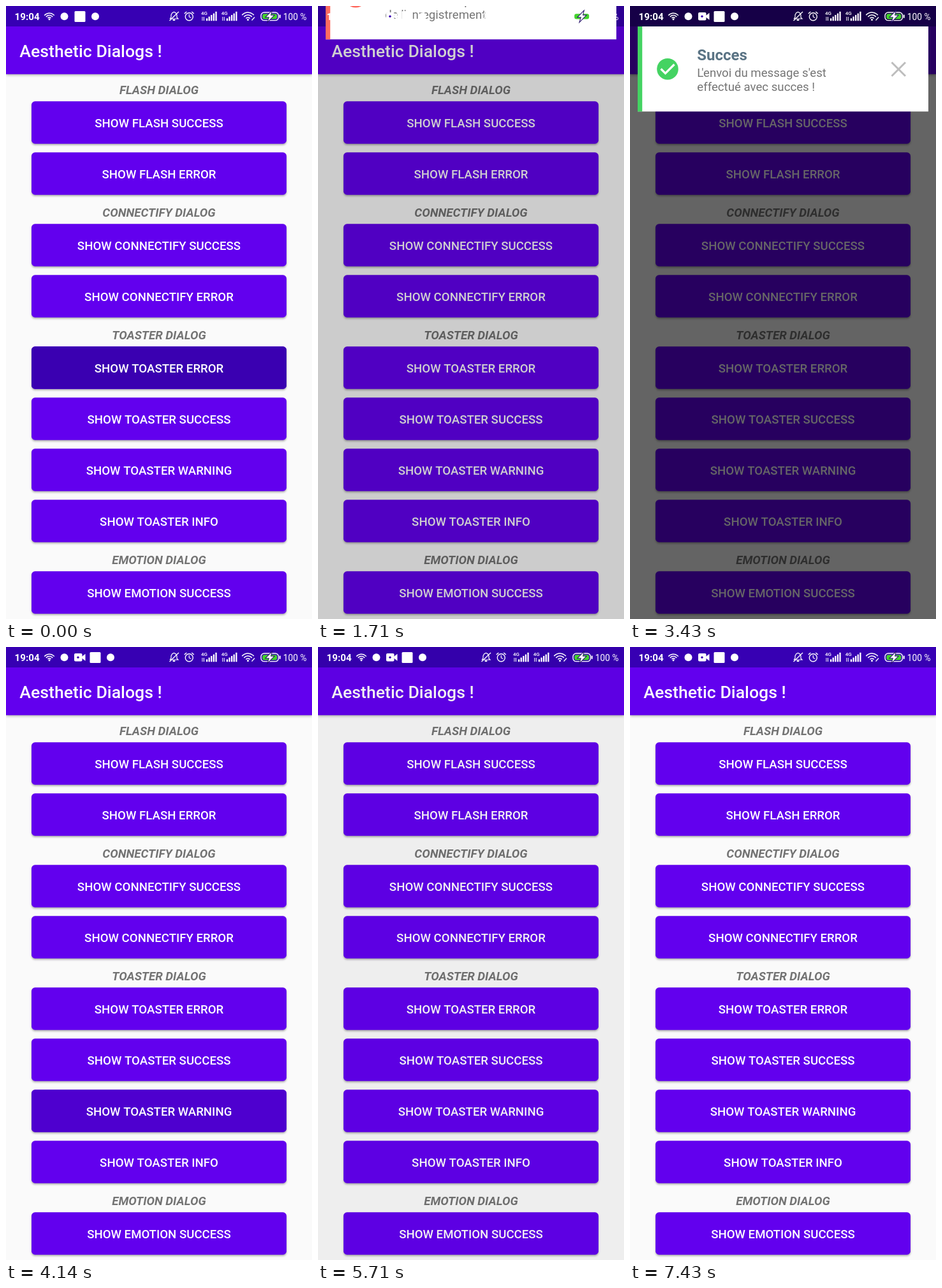
Write an HTML page with a canvas that moves like this. It is 480 px wide and 960 px high and loops after 7.57 s.

```html
<!DOCTYPE html>
<html lang="en">
<head>
<meta charset="utf-8">
<title>Aesthetic Dialogs</title>
<style>
  html, body { margin: 0; width: 100%; height: 100%; overflow: hidden; background: #fafafa; }
  canvas { display: block; width: 480px; height: 960px; }
</style>
</head>
<body>
<canvas id="stage" width="480" height="960"></canvas>
<script>
const ctx = document.getElementById('stage').getContext('2d');
const LOOP = 7570, FPS = 7;
const FONT = 'Roboto, "Noto Sans", sans-serif';

const sections = [
  ['FLASH DIALOG', 107, ['SHOW FLASH SUCCESS', 'SHOW FLASH ERROR']],
  ['CONNECTIFY DIALOG', 299, ['SHOW CONNECTIFY SUCCESS', 'SHOW CONNECTIFY ERROR']],
  ['TOASTER DIALOG', 491, ['SHOW TOASTER ERROR', 'SHOW TOASTER SUCCESS', 'SHOW TOASTER WARNING', 'SHOW TOASTER INFO']],
  ['EMOTION DIALOG', 843, ['SHOW EMOTION SUCCESS']]
];

// press, open and close are counted in ticks of 1/7 s
const toasts = [
  { button: 'SHOW TOASTER ERROR', press: 0, open: 3, close: 9.75, color: '#fe6b60', mark: 'alert',
    title: 'Erreur', lines: ["Un echec s'est produit au cours", "de l'enregistrement"] },
  { button: 'SHOW TOASTER SUCCESS', press: 15, open: 17, close: 24, color: '#44d362', mark: 'check',
    title: 'Succes', lines: ["L'envoi du message s'est", 'effectué avec succes !'] },
  { button: 'SHOW TOASTER WARNING', press: 28, open: 30, close: 37, color: '#febd20', mark: 'alert',
    title: 'Avertissement', lines: ['Veuillez verifier que vous avez', 'completé tous les champs'] },
  { button: 'SHOW TOASTER INFO', press: 42, open: 43, close: 48.75, color: '#3f9cf5', mark: 'info',
    title: 'Information', lines: ['Une nouvelle version de votre', 'application est disponible'] }
];
const OPEN_LEN = 3.17, CLOSE_LEN = 3.25, DIM = 0.6;

const clamp = v => Math.max(0, Math.min(1, v));

function text(str, x, y, size, weight, color, align = 'left') {
  ctx.font = `${weight} ${size}px ${FONT}`;
  ctx.textAlign = align;
  ctx.fillStyle = color;
  ctx.fillText(str, x, y);
}

function rect(x, y, w, h, color, r = 0) {
  ctx.fillStyle = color;
  ctx.beginPath();
  ctx.roundRect(x, y, w, h, r);
  ctx.fill();
}

function disc(x, y, r, color) {
  ctx.fillStyle = color;
  ctx.beginPath();
  ctx.arc(x, y, r, 0, Math.PI * 2);
  ctx.fill();
}

function line(points, color, width) {
  ctx.strokeStyle = color;
  ctx.lineWidth = width;
  ctx.beginPath();
  points.forEach(([x, y]) => ctx.lineTo(x, y));
  ctx.stroke();
}

function shadowed(blur, dy, alpha, draw) {
  ctx.save();
  ctx.shadowColor = `rgba(0,0,0,${alpha})`;
  ctx.shadowBlur = blur;
  ctx.shadowOffsetY = dy;
  draw();
  ctx.restore();
}

function button(label, y, press) {
  shadowed(3, 2, 0.3, () => rect(40, y + 0.3, 400, 66.4, '#6200ee', 5.5));
  if (press > 0) {
    ctx.globalAlpha = press;
    rect(40, y + 0.3, 400, 66.4, '#3a00b1', 5.5);
    ctx.globalAlpha = 1;
  }
  text(label, 240, y + 41, 18.67, 500, '#fff', 'center');
}

function screen(n) {
  rect(0, 0, 480, 960, '#fafafa');
  for (const [name, top, labels] of sections) {
    text(name, 240, top + 30.5, 18.67, 'italic 700', '#737373', 'center');
    labels.forEach((label, i) => {
      const toast = toasts.find(t => t.button === label);
      const age = toast ? n - toast.press : -1;
      button(label, top + 42 + i * 80, age < 0 ? 0 : clamp(1 - age / 2));
    });
  }
  shadowed(4, 1.5, 0.35, () => rect(0, 30, 480, 76.7, '#6200ee'));
  text('Aesthetic Dialogs !', 21.3, 80, 26.67, 500, '#fff');
  rect(0, 0, 480, 32, '#3700b3');
}

function mark(kind) {
  if (kind === 'check') {
    ctx.lineCap = 'butt';
    line([[48.5, 98.5], [55.5, 105.5], [69.5, 91.5]], '#fff', 3.2);
    return;
  }
  const flip = kind === 'info';
  rect(57.2, flip ? 96.5 : 90, 3.4, 10.3, '#fff');
  rect(57.2, flip ? 90 : 103.3, 3.4, 3.4, '#fff');
}

function card(toast, dy) {
  ctx.save();
  ctx.translate(0, dy);
  rect(12, 32, 456, 133.3, '#fff');
  rect(12, 32, 7.2, 133.3, toast.color);
  disc(59, 98.7, 16.8, toast.color);
  mark(toast.mark);
  text(toast.title, 105.3, 85, 24, 700, '#5a7384');
  toast.lines.forEach((s, i) => text(s, 105.3, 111.3 + i * 22, 18.67, 400, '#757575'));
  line([[410.5, 88.2], [432, 109.7]], '#bdbdbd', 3);
  line([[432, 88.2], [410.5, 109.7]], '#bdbdbd', 3);
  ctx.restore();
}

function overlay(n) {
  const toast = toasts.find(t => n >= t.open && n < t.close + CLOSE_LEN);
  if (!toast) return;
  const into = clamp((n - toast.open + 0.17) / OPEN_LEN);
  const out = clamp((n - toast.close) / CLOSE_LEN);
  rect(0, 0, 480, 960, `rgba(0,0,0,${DIM * into * (1 - out)})`);
  const enter = clamp((into - 0.1) / 0.9);
  const lift = (1 - enter) ** 2 + clamp(out * 1.1) ** 1.5;
  if (lift < 1) card(toast, -170 * lift);
}

function wifi(x, y, size) {
  for (let i = 1; i <= 3; i++) {
    ctx.strokeStyle = '#fff';
    ctx.lineWidth = 1.6;
    ctx.beginPath();
    ctx.arc(x, y, size * i / 3, -Math.PI * 0.78, -Math.PI * 0.22);
    ctx.stroke();
  }
  disc(x, y - 0.5, 1.5, '#fff');
}

function camera(x) {
  rect(x - 9, 10, 12.5, 12.5, '#fff', 2);
  ctx.beginPath();
  [[3, 15], [8.5, 10.8], [8.5, 21.7], [3, 17.5]].forEach(([a, b]) => ctx.lineTo(x + a, b));
  ctx.fill();
  disc(x - 3, 16.2, 1.7, '#3700b3');
}

function bell(x) {
  line([[x - 6.5, 20], [x - 4.5, 18], [x - 4.5, 14], [x - 2.5, 10.5], [x, 9.5],
        [x + 2.5, 10.5], [x + 4.5, 14], [x + 4.5, 18], [x + 6.5, 20], [x - 6.5, 20]], '#fff', 1.2);
  rect(x - 2, 21, 4, 2, '#fff', 1);
  line([[x - 7, 23], [x + 7.5, 9]], '#fff', 1.3);
}

function alarm(x) {
  ctx.strokeStyle = '#fff';
  ctx.lineWidth = 1.4;
  ctx.beginPath();
  ctx.arc(x, 16.8, 6, 0, Math.PI * 2);
  ctx.stroke();
  line([[x, 13], [x, 17], [x + 3, 18.5]], '#fff', 1.2);
  line([[x - 7.5, 12], [x - 4, 9]], '#fff', 1.5);
  line([[x + 7.5, 12], [x + 4, 9]], '#fff', 1.5);
}

function signal(x) {
  text('4G', x, 14, 8, 500, '#fff');
  line([[x + 2, 17], [x + 2, 23]], '#fff', 1);
  line([[x + 4.5, 17], [x + 4.5, 23]], '#fff', 1);
  for (let i = 0; i < 5; i++) {
    const h = 4 + i * 2.6;
    rect(x + 8 + i * 3.6, 23.2 - h, 2.3, h, '#fff', 0.5);
  }
}

function battery() {
  ctx.strokeStyle = '#fff';
  ctx.lineWidth = 1.4;
  ctx.beginPath();
  ctx.roundRect(400, 10, 27.5, 12.6, 5);
  ctx.stroke();
  rect(428.7, 13.5, 2, 5.5, '#fff', 1);
  rect(402.2, 12.2, 23, 8.2, '#43d32b', 3);
  ctx.beginPath();
  [[416.5, 8.5], [408, 17.3], [413, 17.3], [411, 24], [420, 14.8], [415, 14.8]]
    .forEach(([x, y]) => ctx.lineTo(x, y));
  ctx.closePath();
  ctx.strokeStyle = '#25106a';
  ctx.lineWidth = 2;
  ctx.stroke();
  ctx.fillStyle = '#fff';
  ctx.fill();
}

function statusIcons(n) {
  const recording = n >= 2;
  const shift = recording ? 24 : 0;
  text('19:04', 13.5, 22, 15.2, 700, '#fff');
  wifi(68, 21.2, 10);
  disc(91.5, 16.3, 6, '#fff');
  if (recording) camera(116);
  rect(107.5 + shift, 8, 17, 17, '#fff', 1.5);
  disc(140 + shift, 16.3, 6, '#fff');
  bell(263.5);
  alarm(287.3);
  signal(306);
  signal(337.8);
  wifi(379.5, 22, 12);
  line([[385.5, 22.5], [390, 17.5]], '#fff', 1.3);
  battery();
  text('100 %', 434.7, 21.5, 13.8, 400, '#fff');
}

function draw(now) {
  const n = Math.floor((now % LOOP + 5) * FPS / 1000) % 53;
  screen(n);
  overlay(n);
  statusIcons(n);
}

let start;
function tick(now) {
  start ??= now;
  draw(now - start);
  requestAnimationFrame(tick);
}
draw(0);
requestAnimationFrame(tick);
</script>
</body>
</html>
```
